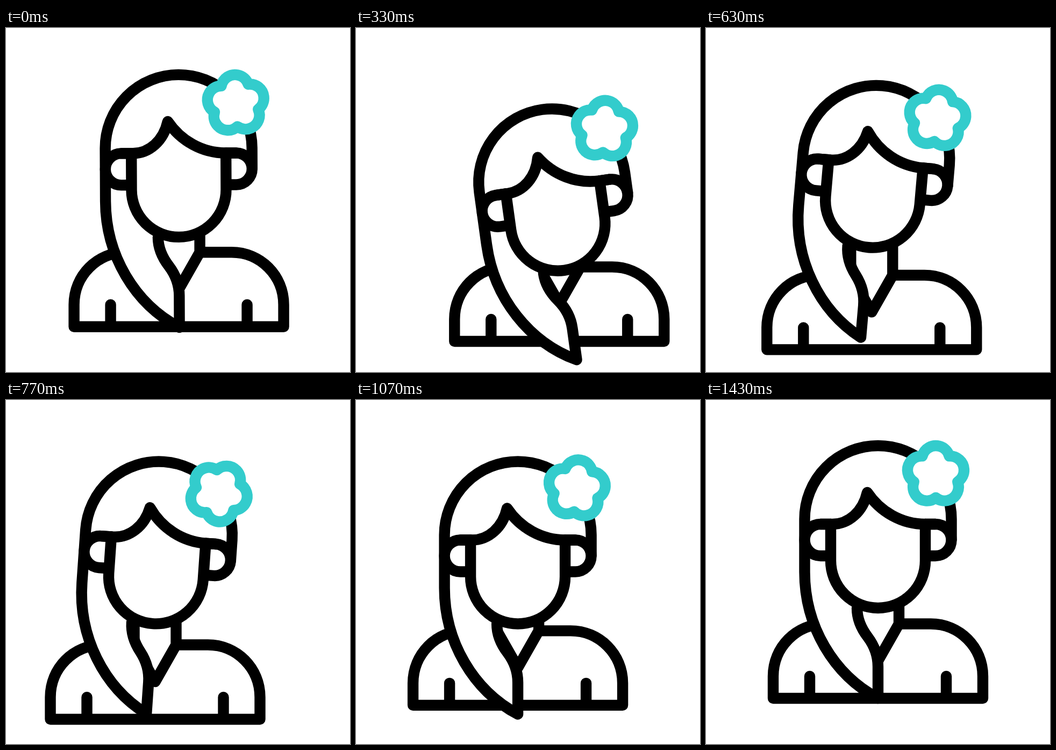
Write an HTML page with a canvas that moves like this. It is 640 by 640 pixels and loops after 1.67 s.

```html
<!DOCTYPE html>
<html lang="en">
<head>
<meta charset="utf-8">
<title>Woman with flower</title>
<style>
  html, body { margin: 0; width: 100%; height: 100%; overflow: hidden; background: #fff; }
  canvas { display: block; width: 100vw; height: 100vh; }
</style>
</head>
<body>
<canvas id="stage" width="640" height="640"></canvas>
<script>
const ctx = document.getElementById('stage').getContext('2d');
const LOOP = 1670, FPS = 30, LAST_STEP = 43;
const START = -40;
const PIVOT = { x: 320, y: 320 };
const FLOWER = { x: 427.5, y: 139, reach: 27.9, lobe: 26 };

const torso = new Path2D(
  'M222 416.5 C168 416.5 125 460 125 514 V555 H515 V514 C515 460 472 416.5 418 416.5 H359' +
  'M281 360 V416.5 L320 485 L359 416.5 V360 M281 416.5 H222' +
  'M193 514 V555 M447 514 V555');
const hair = new Path2D(
  'M456.5 260 V221.5 A136.5 136.5 0 0 0 183.5 221.5 V320 C183.5 420 237 511 320 555' +
  'V496 C320 476 313 457 301 441 C288 424 281 406 281 387');
const ears = new Path2D(
  'M232 231 H213 A29.5 29.5 0 0 0 213 290 H232 M408 231 H427 A29.5 29.5 0 0 1 427 290 H408');
const face = new Path2D('M232 231 V299 A88 88 0 0 0 408 299 V231');
const fringe = new Path2D('M213 231 H235 C265 231 292 208 300 172 C324 208 364 231 408 231 H427');
const petals = makePetals();

// Outer outline of five overlapping circles.
function makePetals() {
  const path = new Path2D(), { reach, lobe } = FLOWER;
  const half = Math.PI / 5;
  const chord = reach * Math.sin(half);
  const notch = reach * Math.cos(half) + Math.sqrt(lobe * lobe - chord * chord);
  const spread = Math.atan2(notch * Math.sin(half), notch * Math.cos(half) - reach);
  for (let i = 0; i < 5; i++) {
    const a = i * 2 * half - Math.PI / 2;
    path.arc(reach * Math.cos(a), reach * Math.sin(a), lobe, a - spread, a + spread);
  }
  path.closePath();
  return path;
}

const clamp01 = v => Math.min(1, Math.max(0, v));
const ease = (t, a, b) => {
  const u = clamp01((t - a) / (b - a));
  return u * u * (3 - 2 * u);
};

// Eased value between [time, value] keys.
function track(t, keys) {
  let value = keys[0][1];
  for (let i = 1; i < keys.length; i++) {
    value += (keys[i][1] - keys[i - 1][1]) * ease(t, keys[i - 1][0], keys[i][0]);
  }
  return value;
}

// Smooth curve through keys; column picks the animated value.
function spline(t, keys, column) {
  const last = keys.length - 1;
  if (t >= keys[last][0]) return keys[last][column];
  let i = 0;
  while (t >= keys[i + 1][0]) i++;
  const slope = k => k === 0 || k === last ? 0 :
    (keys[k + 1][column] - keys[k - 1][column]) / (keys[k + 1][0] - keys[k - 1][0]);
  const span = keys[i + 1][0] - keys[i][0];
  const u = (t - keys[i][0]) / span, v = 1 - u;
  return v * v * (1 + 2 * u) * keys[i][column] + u * u * (3 - 2 * u) * keys[i + 1][column] +
    span * u * v * (v * slope(i) - u * slope(i + 1));
}

const bezier = (p, a, b, c, d) => {
  const q = 1 - p;
  return q * q * q * a + 3 * q * q * p * b + 3 * q * p * p * c + p * p * p * d;
};

function bodyOffset(t) {
  const right = 371, left = 829, home = 1264;
  if (t < right) {
    const p = ease(t, START, right);
    return { x: 59.7 * p, y: 28.7 * p };
  }
  if (t < left) {
    const p = ease(t, right, left);
    return { x: bezier(p, 59.7, 32.1, -32.7, -44.7), y: bezier(p, 28.7, 38.5, 51.8, 37) };
  }
  const p = ease(t, left, home);
  return { x: bezier(p, -44.7, -29.8, -14.1, 0), y: bezier(p, 37, 14.9, 12.3, 0) };
}

const headBob = [[START, 0], [335, 36.5], [643, -22], [981, 18.5], [1422, 0]];
const headTilt = [[START, 0], [333, -7.9], [645, 5], [1067, 0]];
// time, turn in degrees, x drift, y drift
const flowerKeys = [
  [START, 0, 0, 0], [0, -3.3, -0.5, 0.3], [333, -60.7, 2.3, -1.5], [533, -82, 0, -1],
  [767, -44.4, -2, -3.4], [967, -8, 0.5, -5.2], [1167, 14, 2.7, -1.3], [1430, 0, 0, 0]
];

const rotate = degrees => ctx.rotate(degrees * Math.PI / 180);

function outline(path, color, filled) {
  if (filled) ctx.fill(path);
  ctx.strokeStyle = color;
  ctx.stroke(path);
}

function draw(t) {
  const body = bodyOffset(t);
  ctx.setTransform(1, 0, 0, 1, 0, 0);
  ctx.fillStyle = '#fff';
  ctx.fillRect(0, 0, 640, 640);
  ctx.lineWidth = 20.4;
  ctx.lineCap = ctx.lineJoin = 'round';

  ctx.translate(body.x, body.y);
  outline(torso, '#000', false);

  ctx.translate(PIVOT.x, PIVOT.y + track(t, headBob));
  rotate(track(t, headTilt));
  ctx.translate(-PIVOT.x, -PIVOT.y);
  outline(hair, '#000', true);
  outline(ears, '#000', true);
  outline(face, '#000', true);
  outline(fringe, '#000', false);

  ctx.translate(FLOWER.x + spline(t, flowerKeys, 2), FLOWER.y + spline(t, flowerKeys, 3));
  rotate(spline(t, flowerKeys, 1));
  outline(petals, '#33cccc', true);
}

const begin = performance.now();
function tick() {
  const t = (performance.now() - begin) % LOOP;
  const step = Math.min(LAST_STEP, Math.floor((t + 3.4) * FPS / 1000));
  draw(step * 1000 / FPS);
  requestAnimationFrame(tick);
}
tick();
</script>
</body>
</html>
```
